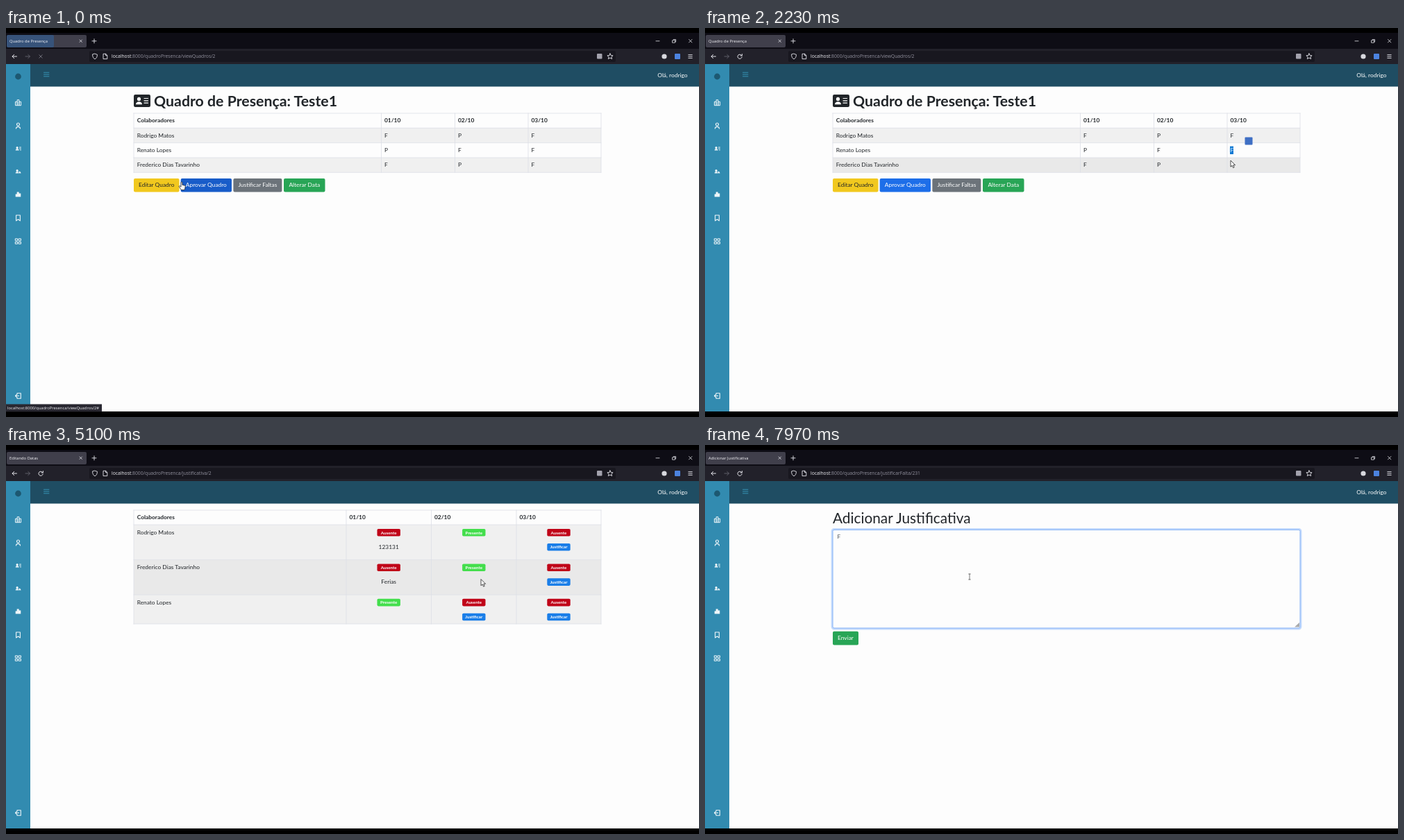
An HTML page that plays this animation: 998x561 px, repeating every 8 s.

```html
<!DOCTYPE html>
<html lang="pt-BR">
<head>
<meta charset="utf-8">
<title>Quadro de Presença</title>
<style>
html, body { margin: 0; width: 100%; height: 100%; overflow: hidden; background: #000; }
svg { display: block; width: 998px; height: 561px; }
text { font-family: Lato, "Open Sans", sans-serif; white-space: pre; }
.ui text { font-family: "Open Sans", "Noto Sans", sans-serif; }
.line { fill: none; stroke-linecap: round; stroke-linejoin: round; }
</style>
</head>
<body>
<svg id="stage" viewBox="0 0 998 561"></svg>
<script>
const LOOP = 8000;
const INK = '#212529', EDGE = '#dcdfe6', STRIPE = '#f0f0f0', HOVER = '#e9e9e9';
const BLUE = '#1d6ee9', GREEN = '#28a556', GREY = '#6c737a';
const PEOPLE = ['Rodrigo Matos', 'Renato Lopes', 'Frederico Dias Tavarinho'];
const DATES = ['01/10', '02/10', '03/10'];

const rect = (x, y, w, h, fill, more = '') =>
  `<rect x="${x}" y="${y}" width="${w}" height="${h}" fill="${fill}" ${more}/>`;
const text = (x, y, s, size = 8.4, fill = INK, more = '') =>
  `<text x="${x}" y="${y}" font-size="${size}" fill="${fill}" ${more}>${s}</text>`;
const line = (d, color, width = 1, more = '') =>
  `<path class="line" d="${d}" stroke="${color}" stroke-width="${width}" ${more}/>`;
const shape = (d, fill) => `<path d="${d}" fill="${fill}"/>`;
const group = (id, body, more = '') => `<g id="${id}" ${more}>${body}</g>`;
const at = (x, y, body) => `<g transform="translate(${x} ${y})">${body}</g>`;
const BOLD = 'font-weight="700"', MID = 'text-anchor="middle"';

const button = (x, w, y, label, fill, color = '#fff', id = '') =>
  rect(x, y, w, 19.6, fill, `rx="2" id="${id}"`) + text(x + w / 2, y + 12.4, label, 8.4, color, MID);

const badge = (x, y, label, fill, id = '') =>
  rect(x - 16.7, y - 5.3, 33.4, 10.6, fill, 'rx="1.8"') +
  text(x, y + 2.2, label, 6.2, '#fff', `${MID} ${BOLD} id="${id}"`);

function browser() {
  const w = '#e6e6ec';
  return rect(0, 7, 998, 23, '#0e0d15') + rect(0, 30, 998, 22, '#22212a') +
    rect(1, 10, 115, 18, '#403f4b', 'rx="2"') +
    rect(1, 10, 68, 18, '#31619a', 'rx="2" id="burst"') +
    '<circle id="spin" cx="6" cy="18.5" r="1" fill="#9aa0ad"/>' +
    text(5, 21, '', 5.8, '#f4f4f8', 'id="tab"') +
    line('M106 17l3.4 3.4m0-3.4l-3.4 3.4', w, .8) +
    line('M124 18.8h6m-3-3v6', w, .9) +
    line('M936 18.8h5M983.5 16.5l4.4 4.4m0-4.4l-4.4 4.4M960 17.8h3.4v3.4h-3.4zM961.2 16.6h3.4v3.4', w, .8) +
    line('M15.5 41h-6.4m2.6-2.6L9 41l2.7 2.6', w, 1) +
    line('M28 41h6.4m-2.6-2.6l2.7 2.6-2.7 2.6', '#5f5e69', 1) +
    group('stop', line('M47.8 38.8l4.4 4.4m0-4.4l-4.4 4.4', '#777681', .9)) +
    group('reload', line('M52.8 39.6a3.1 3.1 0 1 0 .4 2.2M53.4 37.6v2.3h-2.3', w, 1)) +
    rect(120, 33, 758, 16, '#18171f', 'rx="2"') +
    line('M128 37.2l3.4 1.1c0 3.5-1 5.3-3.4 6.5c-2.4-1.2-3.4-3-3.4-6.5z', w, .9) +
    line('M140.4 37.3h3.3l2.1 2.1v5.2h-5.4zM143.5 37.5v2.1h2', w, .9) +
    text(152, 43.4, '<tspan fill="#f0f0f5">localhost</tspan><tspan id="path"></tspan>', 6.75, '#92919e') +
    rect(851, 37, 7.5, 7.5, '#a3a2ad', 'rx="1"') +
    line('M870 36.8l1.2 2.7 2.9.3-2.2 1.9.7 2.9-2.6-1.5-2.6 1.5.7-2.9-2.2-1.9 2.9-.3z', w, .9) +
    '<circle cx="948" cy="41" r="3.6" fill="#d8d8de"/>' +
    rect(963, 37, 8, 8, '#4c83e0', 'rx="1"') +
    line('M982.8 38.6h5.4m-5.4 2.4h5.4m-5.4 2.4h5.4', w, .9);
}

function frame() {
  const w = '#eef6f9';
  const user = line('M-3 4c0-3.6 6-3.6 6 0', w, 1.2) + '<circle cy="-2" r="2" fill="none" stroke="#eef6f9" stroke-width="1.2"/>';
  const crowd = shape('M-3.8 2.6c0-3 5-3 5 0z M-3 -1.3a1.6 1.6 0 1 1 3.2 0a1.6 1.6 0 1 1 -3.2 0z', w);
  return rect(0, 52, 998, 501, '#fdfdfd') + rect(35, 52, 963, 32.5, '#1f4d63') +
    rect(0, 52, 35, 501, '#328bb0') +
    '<circle cx="17.5" cy="70" r="4.4" fill="#1d5871"/>' +
    line('M54.5 64.2h7.4m-7.4 2.8h7.4m-7.4 2.8h7.4', '#3693b4', 1) +
    text(981.5, 70.8, 'Olá, rodrigo', 8.4, '#fff', 'text-anchor="end"') +
    at(17.5, 107.5, line('M-4 3.8v-5h2.7v5zM-1.3 3.8v-7.6h2.7v7.6zM1.4 3.8v-5h2.7v5z', w, 1)) +
    at(17.5, 141, user) +
    at(17.5, 174, crowd + line('M2 -2h2m-2 2h2m-1 2h1', w, .9)) +
    at(17.5, 207, crowd + shape('M1.6 2.6c0-1.4-.3-2-1-2.8c1.8-.5 3.4.8 3.4 2.8z', w)) +
    at(17.5, 240, shape('M-3.8 3.4v-4h2v-3h3v2h2.6v5z', w)) +
    at(17.5, 274, line('M-2.9 -4h5.8v8l-2.9-2.1-2.9 2.1z', w, 1.1)) +
    at(17.5, 307.5, line('M-3.8-3.6h3v2.8h-3zM1-3.6h3v2.8h-3zM-3.8 1h3v2.8h-3zM1 1h3v2.8h-3z', w, 1)) +
    at(17.5, 530.5, line('M-1.5-2v-1.8h5.3v7.6h-5.3v-1.8M1 0h-5m1.8-1.8l-1.8 1.8 1.8 1.8', w, 1.1));
}

// Shared table: row edges, column edges, row backgrounds with ids for hovering
function table(id, ys, xs) {
  const rows = ys.slice(1, -1).map((y, i) =>
    rect(184, y, 673, ys[i + 2] - y, i % 2 ? '#fdfdfd' : STRIPE, `id="${id}${i}"`)).join('');
  const end = ys[ys.length - 1];
  const edges = ys.map(y => `M184 ${y}H857`).join('') +
    [184, ...xs, 857].map(x => `M${x} ${ys[0]}V${end}`).join('');
  return rows + line(edges, EDGE, .8) +
    text(188.7, ys[0] + 13.4, 'Colaboradores', 8.4, INK, BOLD) +
    DATES.map((d, i) => text(xs[i] + 4.5, ys[0] + 13.4, d, 8.4, INK, BOLD)).join('');
}

const BOARD_Y = [123, 144.3, 165.6, 187, 208.3], BOARD_X = [540.5, 646.5, 752];
const LIST_Y = [94, 115, 165.6, 216, 258], LIST_X = [490, 612.5, 735];

function board() {
  const marks = ['FPF', 'PFF', 'FPF'];
  const cells = PEOPLE.map((name, r) => {
    const y = 157.8 + r * 21.3;
    return text(188.7, y, name) +
      rect(756, y - 8.5, 5, 11.4, '#0e79d3', `id="sel${r}"`) +
      [...marks[r]].map((m, c) => text(BOARD_X[c] + 4.5, y, m, 8.4, INK, `id="m${r}${c}"`)).join('');
  }).join('');
  return rect(184, 96, 24, 18, INK, 'rx="2.2"') +
    '<circle cx="191.5" cy="102.4" r="2.6" fill="#fff"/>' +
    shape('M187 110.3c0-5.4 9-5.4 9 0z', '#fff') +
    line('M199 101.5h5.5m-5.5 3.3h5.5m-5.5 3.3h5.5', '#fff', 1.2) +
    text(213, 112.8, 'Quadro de Presença: Teste1', 21.3, INK, BOLD) +
    table('b', BOARD_Y, BOARD_X) + cells +
    button(184, 65.5, 217, 'Editar Quadro', '#f1c81e', INK) +
    button(251.7, 73.3, 217, 'Aprovar Quadro', BLUE, '#fff', 'approve') +
    button(327.4, 70, 217, 'Justificar Faltas', GREY, '#fff', 'justify') +
    button(400, 59.5, 217, 'Alterar Data', GREEN);
}

function list() {
  const order = [0, 2, 1], states = ['APA', 'APA', 'PAA'], notes = ['123131', 'Ferias'];
  const cols = [551.2, 673.8, 796];
  return table('l', LIST_Y, LIST_X) + order.map((p, r) => {
    const y = 126.3 + r * 50.4;
    return text(188.7, y + 2.4, PEOPLE[p]) + cols.map((x, c) => {
      if (states[r][c] === 'P') return badge(x, y, 'Presente', '#43de4c');
      const note = c === 0 && notes[r];
      return badge(x, y, 'Ausente', '#c00418') + (note
        ? text(x, y + 23.2, note, 8.4, INK, MID)
        : badge(x, y + 20.9, 'Justificar', '#1a7ee8', `j${r}${c}`));
    }).join('');
  }).join('');
}

function form() {
  return text(184, 112.8, 'Adicionar Justificativa', 20.8) +
    rect(182.8, 121.2, 675.4, 144, 'none', 'rx="3" stroke="#c3dafd" stroke-width="2.4" id="glow"') +
    rect(184, 122.4, 673, 141.6, '#fdfdfd', 'rx="2" stroke="#ced4da" stroke-width="1" id="area"') +
    shape('M856 256v6.5h-7z', '#a9abae') +
    text(190.5, 135.2, 'F', 8.2, '#495057', 'id="typed"') +
    line('M190.8 128v8.5', INK, .7, 'id="caret"') +
    button(184, 37, 268.8, 'Enviar', GREEN);
}

const pointers =
  group('arrow', `<path d="M0 0v9.2l2.1-1.9 1.5 3.3 1.6-.7-1.5-3.2h2.9z" fill="#fff" stroke="#222" stroke-width=".8"/>`) +
  group('hand', `<path d="M-1 .8c0-1.1 1.9-1.1 1.9 0v3.5l3.2.8c.9.3 1.2.8 1.1 1.7l-.6 3.2-.8 1.5h-4.300l-3.200-4.600c-.5-.9.5-1.600 1.300-.9l1.400 1.200z" fill="#fff" stroke="#222" stroke-width=".8"/>`) +
  group('beam', line('M-1.3-4h2.600M0-4v8M-1.300 4h2.600', '#444', .7));

document.getElementById('stage').innerHTML =
  rect(0, 0, 998, 561, '#000') + frame() + group('ui', browser(), 'class="ui"') +
  group('board', board()) + group('list', list()) + group('form', form()) +
  rect(777.5, 157.500, 11, 11, '#3f6fc4', 'rx="1" id="chip"') +
  group('status', rect(0, 542.500, 138, 10.800, '#292831') + text(2, 550, '', 5.8, '#f2f2f6', 'id="hint"'), 'class="ui"') +
  group('pointer', pointers);

const ui = {};
document.querySelectorAll('[id]').forEach(n => { if (n.id) ui[n.id] = n; });
const show = (id, on) => ui[id].setAttribute('display', on ? 'inline' : 'none');
const fill = (id, color) => ui[id].setAttribute('fill', color);
const put = (id, s) => { if (ui[id].textContent !== s) ui[id].textContent = s; };

// time, x, y of the pointer
const ROUTE = [
  [0, 253, 222], [120, 256, 222], [420, 470, 190], [830, 753, 151], [950, 755, 150],
  [1130, 766, 149], [1600, 766, 150], [1850, 754, 170], [2020, 763, 170], [2230, 757, 191],
  [2360, 754, 192], [2480, 764, 192], [2650, 764, 194], [3130, 640, 262], [3300, 640, 262],
  [3720, 364, 233], [4250, 363, 232], [4500, 462, 211], [4930, 640, 193], [5420, 797, 195],
  [6400, 797, 195], [6630, 770, 196], [7080, 381, 190], [8000, 381, 190]
];

function place(t) {
  const i = Math.max(1, ROUTE.findIndex(p => p[0] > t));
  const [a, b] = [ROUTE[i - 1], ROUTE[i]];
  let k = (t - a[0]) / (b[0] - a[0]);
  k = k * k * (3 - 2 * k);
  return [a[1] + (b[1] - a[1]) * k, a[2] + (b[2] - a[2]) * k];
}

const inside = (x, y, l, t, r, b) => x >= l && x <= r && y >= t && y <= b;
const within = (t, a, b) => t >= a && t < b;

function draw(t) {
  const [x, y] = place(t);
  const page = t < 4330 ? 'board' : t < 6330 ? 'list' : 'form';
  for (const p of ['board', 'list', 'form']) show(p, p === page);

  const early = t < 130;
  const busy = within(t, 4130, 4380) || within(t, 5620, 6480);
  const waiting = within(t, 4130, 4300) || within(t, 5620, 6080);
  put('tab', t < 4300 ? 'Quadro de Presença' : t < 6090 ? 'Editando Datas' : 'Adicionar Justificativa');
  ui.tab.setAttribute('x', busy ? 17 : 5);
  put('path', ':8000/quadroPresenca/' + (t < 4300 ? 'viewQuadros/2' : t < 6090 ? 'justificativa/2' : 'justificarFalta/231'));
  show('spin', busy);
  ui.spin.setAttribute('cx', 6 + 2 * Math.sin((t - 6130) / 160));
  ui.burst.setAttribute('opacity', Math.max(0, .6 * (1 - t / 400)));
  show('stop', early || waiting);
  show('reload', !early && !waiting);

  const overApprove = inside(x, y, 251, 217, 325, 236.6);
  const overJustify = inside(x, y, 327, 217, 397.5, 236.6);
  fill('approve', overApprove ? '#185cc9' : BLUE);
  fill('justify', overJustify ? '#636a71' : GREY);
  show('status', (page === 'board' && overApprove) || busy);
  put('hint', busy ? 'localhost' : 'localhost:8000/quadroPresenca/viewQuadros/2#');

  const hover = (id, ys) => {
    for (let r = 0; r < 3; r++) {
      const on = inside(x, y + 6, 184, ys[r + 1], 857, ys[r + 2] - .1);
      fill(id + r, on ? HOVER : r % 2 ? '#fdfdfd' : STRIPE);
    }
  };
  hover('b', BOARD_Y);
  hover('l', LIST_Y);

  [[1040, 1920], [1940, 2400], [2420, 2950]].forEach(([a, b], r) => {
    const on = within(t, a, b);
    show('sel' + r, on);
    fill(`m${r}2`, on ? '#d9efff' : INK);
  });
  show('chip', within(t, 1300, 2450));

  const pressed = page === 'list' && t > 5600;
  fill('j12', pressed ? '#1b5fae' : '#fff');

  const focus = t >= 7030;
  show('glow', focus);
  ui.area.setAttribute('stroke', focus ? '#86b2f5' : '#ced4da');
  show('caret', within(t, 7030, 7540));
  show('typed', t >= 7770);

  const hand = page === 'board' ? overApprove || overJustify
    : page === 'list' && inside(x, y, 779, 192, 813, 203);
  const beam = page === 'form' && inside(x, y, 184, 122, 857, 264);
  show('hand', hand);
  show('beam', beam);
  show('arrow', !hand && !beam);
  show('pointer', !within(t, 5950, 6330));
  ui.pointer.setAttribute('transform', `translate(${x.toFixed(2)} ${y.toFixed(2)})`);
}

function tick() {
  draw(performance.now() % LOOP);
  requestAnimationFrame(tick);
}
tick();
</script>
</body>
</html>
```
